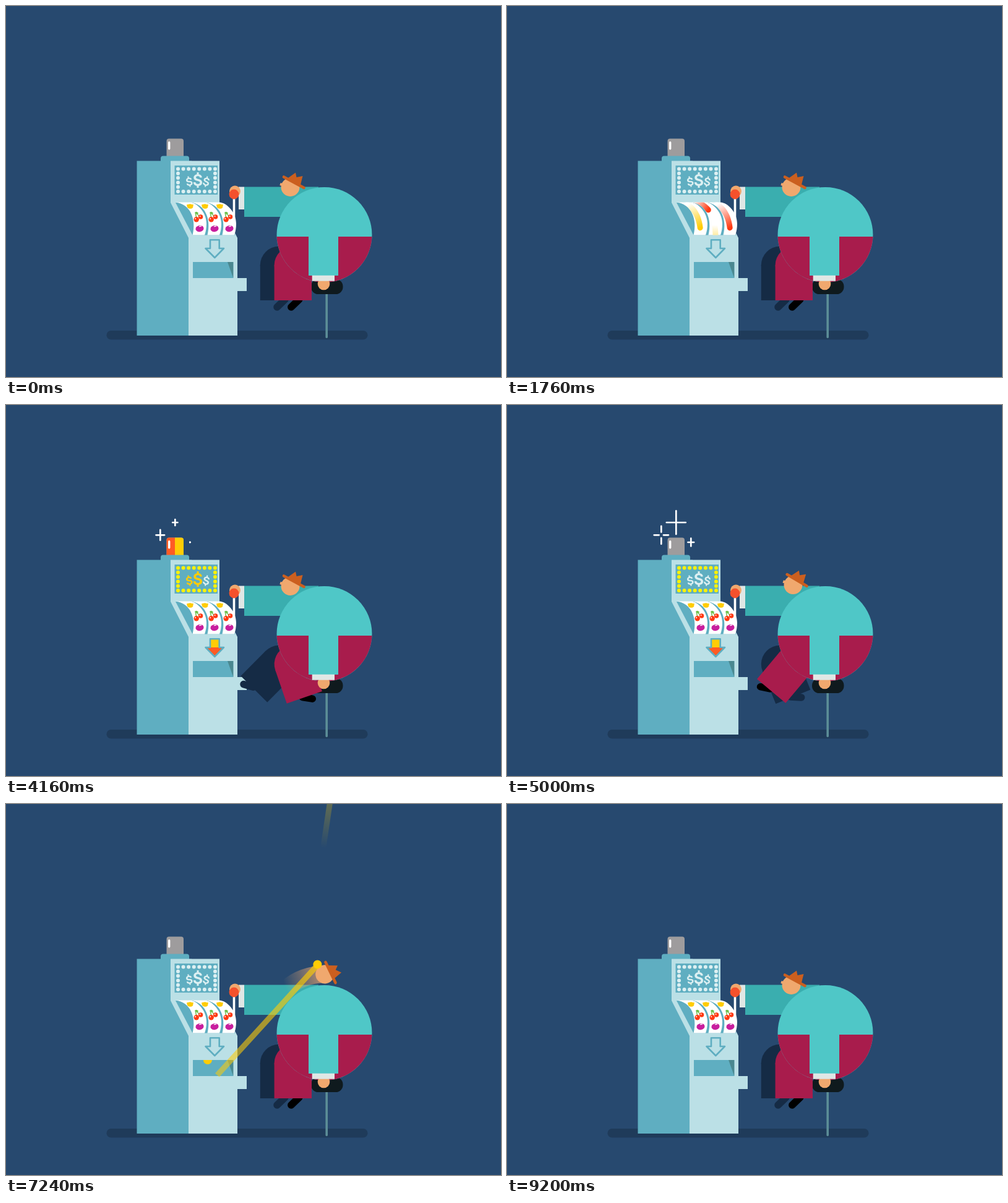
Write an HTML page with a canvas that moves like this. It is 800 px wide and 600 px high and loops after 10000 ms.

```html
<!DOCTYPE html>
<html lang="en">
<head>
<meta charset="utf-8">
<title>Slot machine</title>
<style>
html, body { margin: 0; width: 100%; height: 100%; overflow: hidden; background: #27496f; }
canvas { display: block; }
</style>
</head>
<body>
<canvas id="stage" width="800" height="600"></canvas>
<script>
const c = document.getElementById('stage').getContext('2d');
const LOOP = 10000, TAU = Math.PI * 2, DEG = Math.PI / 180;
const TEAL = '#5faec1', PALE = '#bbe0e6', SKIN = '#f0a86e', HAIR = '#cb5f1f', YELLOW = '#ffcc05',
  ORANGE = '#ff5b24', PANTS = '#a81c4c', SHIRT = '#4fc7c7', CUFF = '#dfe7e5', NAVY = '#152b45';

const clamp = v => Math.max(0, Math.min(1, v));
const ramp = (t, a, b) => clamp((t - a) / (b - a));
const ease = (t, a, b) => { const p = ramp(t, a, b); return p * p * (3 - 2 * p); };
const mod = (a, n) => ((a % n) + n) % n;
const mix = (a, b, p) => [a[0] + (b[0] - a[0]) * p, a[1] + (b[1] - a[1]) * p];

function rect(x, y, w, h, fill, r = 0) {
  c.fillStyle = fill; c.beginPath(); c.roundRect(x, y, w, h, r); c.fill();
}
function disc(x, y, r, fill) {
  c.fillStyle = fill; c.beginPath(); c.arc(x, y, r, 0, TAU); c.fill();
}
function oval(x, y, rx, ry, turn, fill) {
  c.fillStyle = fill; c.beginPath(); c.ellipse(x, y, rx, ry, turn, 0, TAU); c.fill();
}
function poly(pts, fill) {
  c.fillStyle = fill; c.beginPath();
  pts.forEach(p => c.lineTo(...p));
  c.closePath(); c.fill();
}
function line(pts, width, color, cap = 'round') {
  c.strokeStyle = color; c.lineWidth = width; c.lineCap = cap; c.lineJoin = 'round';
  c.beginPath(); pts.forEach(p => c.lineTo(...p)); c.stroke();
}
function at(x, y, turn, draw) {
  c.save(); c.translate(x, y); c.rotate(turn); draw(); c.restore();
}
function fade(a, b, from, to) {
  const g = c.createLinearGradient(...a, ...b);
  g.addColorStop(0, from); g.addColorStop(1, to);
  return g;
}

// ---- machine ----
const lightsOn = t => t >= 2700 && t < 5950;

function dollar(x, y, size, turn, color) {
  at(x, y, turn, () => {
    c.scale(size, size);
    c.fillStyle = color;
    c.font = '700 25px Inter, Arial, sans-serif';
    c.textAlign = 'center';
    c.fillText('S', 0, 9.2);
    line([[0, -12.5], [0, -8]], 3, color, 'butt');
    line([[0, 8], [0, 12.5]], 3, color, 'butt');
  });
}

function sign(t) {
  const lit = lightsOn(t), off = '#ddf0f2';
  rect(272.5, 258, 69.5, 47, TEAL);
  for (let i = 0; i < 8; i++) for (let j = 0; j < 6; j++)
    if (i % 7 == 0 || j % 5 == 0) disc(278 + i * 8.57, 263.5 + j * 7.3, 3, lit ? '#fff200' : off);
  const step = mod((t - 2932) / 528, 1) * 6;
  const tint = k => lit && t >= 2932 && mod(step - k, 6) < 3 ? YELLOW : off;
  dollar(296, 284, .7, -.2, tint(0));
  dollar(310, 281.5, 1, 0, tint(1));
  dollar(323.7, 284, .7, .2, tint(2));
}

function lamp(t) {
  rect(259.5, 214.5, 27.5, 32, '#9e9c9d', 4);
  const p = (t - 2680) / 480 % 1;
  if (lightsOn(t) && p < .5) {
    rect(259.5, 214.5, 13.5, 32, p < .25 ? ORANGE : YELLOW, [4, 0, 0, 0]);
    rect(273, 214.5, 14, 32, p < .25 ? YELLOW : ORANGE, [0, 4, 0, 0]);
  }
  line([[263.7, 220.7], [263.7, 230.8]], 3.4, '#fff');
  rect(250, 242.5, 46, 12, TEAL, 4);
}

// Arms grow from the centre, then open up from the inside.
function sparkle(t, x, y, rx, ry, start) {
  const n = (t - start) / 613;
  if (n < 0 || n >= 5) return;
  const p = n % 1, out = clamp(p * 2), inn = clamp(p * 2 - 1);
  if (inn > .93) return;
  for (const [dx, dy] of [[rx, 0], [-rx, 0], [0, ry], [0, -ry]])
    line([[x + dx * inn, y + dy * inn], [x + dx * out, y + dy * out]], 2.7, '#fff');
}

const SYMBOLS = [YELLOW, '#ff3a12', '#c81e9e'];
const PHASE = [.82, 1.37, 1.77];
const track = u => {
  const v = 1 - u;
  return [v * v * 276 + 2 * u * v * 314 + u * u * 313, v * v * 316 + 2 * u * v * 322 + u * u * 376];
};

function fruit() {
  oval(297.5, 324, 5, 3.8, .15, YELLOW);
  line([[293, 322], [302, 322]], 2, YELLOW);
  line([[308, 344], [306, 334], [314, 341]], 1.4, '#6cc04a');
  oval(308.5, 334.5, 2.6, 1.3, .5, '#6cc04a');
  disc(307.7, 345.3, 4.2, '#ff3a12');
  disc(314.6, 341, 3.7, '#ff3a12');
  disc(306.2, 344, 1, '#fff');
  disc(313.6, 340, .9, '#fff');
  oval(313, 360, 6.6, 5.2, -.2, '#c81e9e');
  line([[312.5, 356.5], [315.5, 356]], 1.3, '#fff');
}

function reel(t, i) {
  c.save();
  c.translate(i * 24, 0);
  c.beginPath();
  c.moveTo(274, 317.5); c.lineTo(297, 317.5);
  c.bezierCurveTo(309, 318, 324, 334, 324, 352);
  c.quadraticCurveTo(324, 362, 321, 370.5);
  c.lineTo(301.5, 370.5);
  c.bezierCurveTo(308, 345, 298, 320, 274, 317.5);
  c.fillStyle = '#fff'; c.fill(); c.clip();
  if (t > 1050 + i * 40 && t < 2250 + i * 170) {
    SYMBOLS.forEach((color, k) => {
      const end = mod(PHASE[i] + (t - 1760) * .006 - .95 * k, 2.85), tail = end - .6;
      const pts = Array.from({ length: 16 }, (_, n) => track(tail + .6 * n / 15));
      if (tail < 1) line(pts, 9, fade(track(Math.max(tail, 0)), track(Math.min(end, 1.2)), '#fff', color));
    });
  } else fruit();
  c.restore();
}

function machine(t) {
  rect(162.5, 525, 422, 14.5, '#1f3b5a', 7.2);
  lamp(t);
  poly([[211.5, 250.5], [300, 250.5], [300, 533], [211.5, 533]], TEAL);
  poly([[266, 250.5], [345, 250.5], [345, 318], [374, 375], [374, 533], [295, 533], [295, 375], [266, 318]], PALE);
  rect(370, 440, 19, 21, PALE);
  sign(t);
  poly([[274, 318], [345, 318], [366, 340], [370, 370.5], [301.5, 370.5]], TEAL);
  for (let i = 0; i < 3; i++) reel(t, i);
  const arrow = [[330, 378.3], [344.7, 378.3], [344.7, 392], [352, 392], [337.3, 407], [322.5, 392], [330, 392]];
  if (lightsOn(t)) {
    rect(330, 378, 15, 14, YELLOW);
    poly([[322.5, 392], [352, 392], [337.3, 407]], ORANGE);
  }
  line([...arrow, arrow[0], arrow[1]], 2.6, TEAL);
  rect(302, 414, 65.3, 26, TEAL);
  poly([[358, 414], [367.3, 414], [367.3, 440]], '#4a8890');
  sparkle(t, 273.3, 190, 15.5, 19, 2854);
  sparkle(t, 249.3, 210.3, 11.5, 14.5, 2756);
  sparkle(t, 297.3, 222, 6.5, 8.5, 2934);
}

// ---- coins: [hit time, head swing in degrees, sideways drift of the bounce] ----
const COINS = [[5560, 15, .45], [6500, 18, .42], [6780, 22, .3], [7020, 26, .147],
  [7240, 36, .25], [7480, 34, .2], [7740, 36, .22], [8000, 36, .3]];
const TRAY = [340, 440], BODY = [514.5, 370];
const onBody = (x, y, deg) => {
  const s = Math.sin(deg * DEG), k = Math.cos(deg * DEG);
  return [BODY[0] + x * k - y * s, BODY[1] + x * s + y * k];
};
const gold = a => `rgba(255,204,5,${a})`;

function coin(t, [hit, swing, drift]) {
  const d = t - hit;
  if (d < -300 || d > 400) return;
  if (d < -120) {
    c.save();
    c.beginPath(); c.rect(302, 414, 65.3, 26); c.clip();
    const p = ramp(d, -300, -120);
    disc(325 + 8 * p * p, 404 + 20 * p + 28 * p * p, 7, YELLOW);
    c.restore();
    return;
  }
  const nose = onBody(-11.5, -109, swing - 36);
  const streak = (a, b, from, to) => line([a, b], 9, fade(a, b, gold(from), gold(to)), 'butt');
  if (d < 120) {
    const a = mix(TRAY, nose, clamp(d / 120)), b = mix(TRAY, nose, clamp(d / 120 + 1));
    streak(a, b, .55, .65);
    if (d <= 0) disc(...b, 7, YELLOW);
  }
  if (d > 0) {
    const up = s => [nose[0] + drift * s, nose[1] - s];
    const tail = up(Math.max(0, d - 100) * 1.6), tip = up(d * 1.6);
    streak(tail, tip, 0, .6);
    disc(...tip, 7, YELLOW);
  }
}

// ---- player ----
const kick = t => ease(t, 3350, 3650) * (1 - ease(t, 6100, 6480));
const beat = t => Math.cos((t - 5000) / 544 * TAU);
const pull = t => ease(t, 720, 1020) * (1 - ease(t, 1120, 1560));

function headTurn(t) {
  if (t > 7930) {
    if (t < 8720) return 372 * (1 - Math.pow(1 - ramp(t, 7930, 8720), 1.8));
    return 360 + 12 * (1 - ease(t, 8720, 9200));
  }
  let h = 13 * ease(t, 620, 800) * (1 - ease(t, 820, 1050)) + kick(t) * (1.1 + 1.1 * beat(t));
  for (const [hit, swing] of COINS)
    h += swing * ramp(t, hit - 70, hit) * (1 - ease(t, hit, hit + 150));
  return h;
}

function head(t) {
  const turn = headTurn(t), old = headTurn(t - 100), rest = Math.atan2(-77, -55);
  if (t > 5400 && t < 8900 && turn - old > 3) {
    const from = onBody(-67, -72, old), to = onBody(-55, -77, turn);
    c.strokeStyle = fade(from, to, 'rgba(240,168,110,0)', 'rgba(240,168,110,.75)');
    c.lineWidth = 28; c.lineCap = 'butt';
    c.beginPath();
    c.arc(...BODY, 94.6, rest + (old - 8) * DEG, rest + turn * DEG);
    c.stroke();
  }
  at(...onBody(-55, -77, turn), turn * DEG, () => {
    line([[-16.5, -5], [-10, -3]], 4.4, SKIN, 'butt');
    disc(0, 0, 15, SKIN);
    poly([[-5, -14], [8.5, -23.5], [10, -16], [20, -18], [16, -2]], HAIR);
    line([[-10.5, -16.5], [22, 1]], 4.6, HAIR);
  });
}

function leg(x, deg, swing, fill, shoe) {
  at(x, 419, deg * DEG, () => {
    line([[10 - 14 * swing * swing, 55.5], [-3 - 15 * swing, 68 - 5 * swing * swing]], 11.5, shoe);
    disc(0, 0, 30.2, fill);
    rect(-30.2, 0, 60.4, 57, fill);
  });
}

function lever(t) {
  const p = pull(t), turn = -22 * p * DEG, s = Math.sin(turn), k = Math.cos(turn);
  const ball = [500 - 131.5 * k + 12.5 * s, 317 - 131.5 * s - 12.5 * k];
  line([[368.5, 346], ball], 3.6, '#fff');
  return turn;
}

function arm(turn) {
  at(500, 317, turn, () => {
    rect(-115, -24.5, 120, 48.5, '#3aaeaf');
    rect(-124, -24.5, 9, 36.5, CUFF);
    disc(-130, -17.5, 9, SKIN);
    disc(-131.5, -12.5, 7.9, '#f4512c');
  });
}

function player(t, turn) {
  const k = kick(t), b = beat(t);
  const tap = t > 1820 && t < 2620 ? Math.abs(Math.sin((t - 1820) / 400 * Math.PI)) : 0;
  const lift = pull(t);
  const lag = ease(t, 3350, 3650) * (1 - ease(t, 6250, 6600));
  line([[518.2, 460], [518.2, 535.5]], 3.6, '#5c8e97');
  leg(441, k * (12 - 34 * b), lag * (k > .99 ? -b : -.7) - .3 * tap - .3 * lift, NAVY, NAVY);
  rect(493, 442, 51.5, 24, '#0f1a1e', 11.5);
  arm(turn);
  head(t);
  leg(463.8, k * (10 + 30 * b), lag * (k > .99 ? b : .55) + .25 * lift, PANTS, '#000');
  at(...BODY, -4 * lift * DEG, () => {
    disc(0, 0, 77, SHIRT);
    const a = Math.asin(3 / 77);
    c.fillStyle = PANTS;
    c.beginPath(); c.arc(0, 0, 77, a, Math.PI - a); c.fill();
  });
  rect(489, 370, 48, 66, SHIRT);
  disc(513.5, 449.5, 9.8, SKIN);
  rect(494.7, 435.7, 36.3, 9, CUFF);
}

function frame(now) {
  const t = now % LOOP;
  rect(0, 0, 800, 600, '#27496f');
  machine(t);
  player(t, lever(t));
  COINS.forEach(k => coin(t, k));
  requestAnimationFrame(frame);
}
requestAnimationFrame(frame);
</script>
</body>
</html>
```
